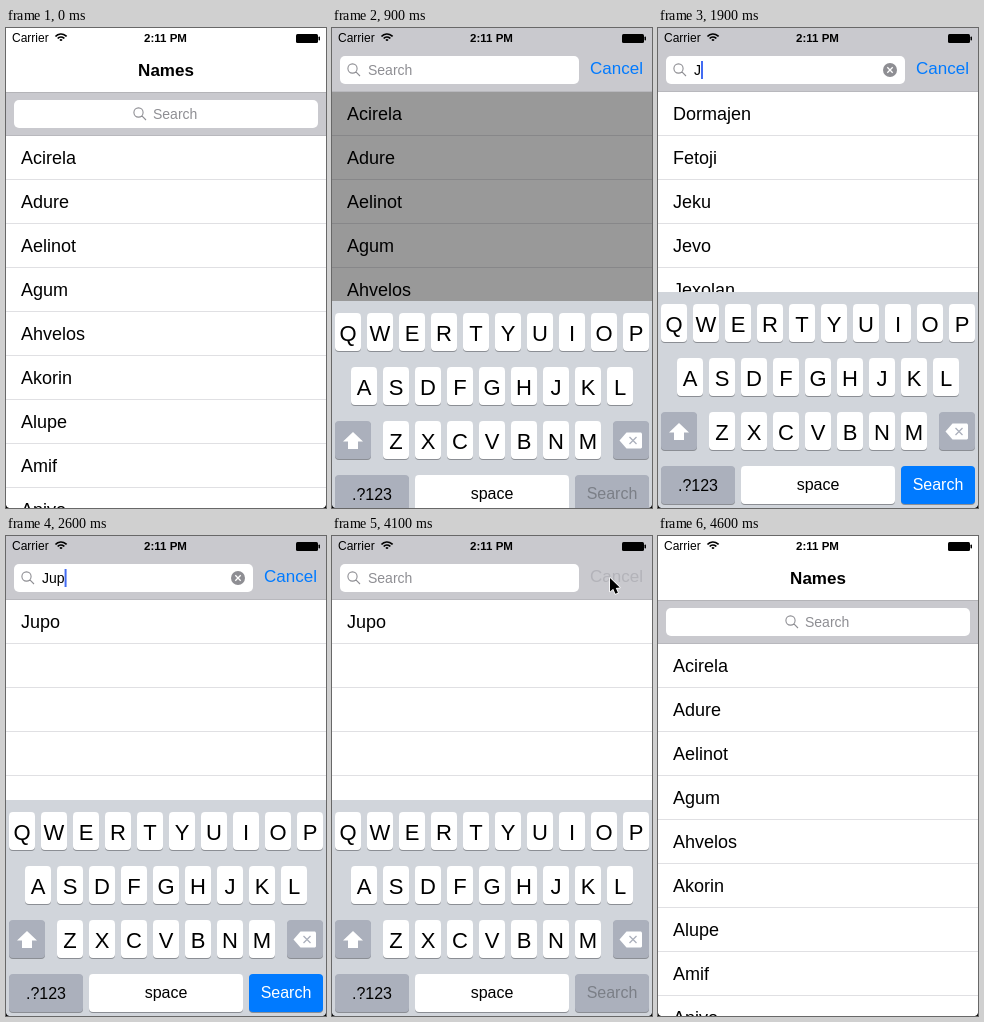
Animation, 320 px wide and 480 px high, one loop 5400 ms. Source, as an HTML page with a canvas:

```html
<!DOCTYPE html>
<html lang="en">
<head>
<meta charset="utf-8">
<title>Search list</title>
<style>
html, body { margin: 0; width: 100%; height: 100%; overflow: hidden; background: #fff; }
canvas { display: block; }
</style>
</head>
<body>
<canvas id="stage" width="320" height="480"></canvas>
<script>
const ctx = document.getElementById('stage').getContext('2d');
const LOOP = 5400, STEP = 100;
const QUERY = 'Jupo', KEY_TIMES = [1900, 2200, 2500, 2800], CLEAR = 4100;
const PEOPLE = ['Acirela', 'Adure', 'Aelinot', 'Agum', 'Ahvelos', 'Akorin', 'Alupe', 'Amif', 'Anivo'];
const RESULTS = [
  ['Dormajen', 'Fetoji', 'Jeku', 'Jevo', 'Jexolan'],
  ['Jupo', 'Juranvel', 'Jusdor', 'Jutemo', 'Juvika'],
  ['Jupo'],
  ['Jupo']
];
const GRAY = '#8e8e93', BLUE = '#007aff', BAR = '#c9c9ce', DARK_KEY = '#abb0bc';

const clamp = v => Math.max(0, Math.min(1, v));
const mix = (a, b, p) => a + (b - a) * p;
const smooth = v => { v = clamp(v); return v * v * (3 - 2 * v); };
const settle = d => d < 0 ? 0 : 1 - Math.exp(-d * 0.0126);

function box(x, y, w, h, color, r = 0) {
  ctx.fillStyle = color;
  ctx.beginPath();
  ctx.roundRect(x, y, w, h, r);
  ctx.fill();
}

function text(s, x, y, size, color = '#000', align = 'left', weight = '') {
  ctx.font = `${weight} ${size}px "Liberation Sans", Arial, sans-serif`;
  ctx.textAlign = align;
  ctx.fillStyle = color;
  ctx.fillText(s, x, y);
}

function poly(points, color) {
  ctx.beginPath();
  points.forEach(([x, y]) => ctx.lineTo(x, y));
  ctx.closePath();
  ctx.fillStyle = color;
  ctx.fill();
}

function cross(x, y, r, color) {
  ctx.beginPath();
  ctx.moveTo(x - r, y - r); ctx.lineTo(x + r, y + r);
  ctx.moveTo(x + r, y - r); ctx.lineTo(x - r, y + r);
  ctx.strokeStyle = color;
  ctx.lineWidth = 1.3;
  ctx.stroke();
}

function drawStatus() {
  text('Carrier', 6, 14, 12);
  ctx.strokeStyle = '#000';
  ctx.lineWidth = 1.7;
  for (const r of [7.4, 4.4, 1.3]) {
    ctx.beginPath();
    ctx.arc(55, 13.4, r, -Math.PI * 0.77, -Math.PI * 0.23);
    ctx.stroke();
  }
  text('2:11 PM', 159.5, 14, 11.5, '#000', 'center', 'bold');
  box(290, 6, 22, 9, '#000', 1.5);
  box(312.5, 8.5, 1.5, 4, '#000', 0.7);
}

function drawList(names, top) {
  box(0, top, 320, 480 - top, '#fff');
  for (let i = 0; top + i * 44 < 480; i++) {
    const y = top + i * 44;
    if (names[i]) text(names[i], 15, y + 28, 18);
    box(0, y + 43, 320, 1, '#e0e0e3');
  }
}

function drawSearchBar(p, query, caret, cancelColor) {
  const top = Math.round(mix(64, 0, p)), bottom = Math.round(mix(108, 64, p));
  const y = Math.round(mix(72, 28, p));
  box(0, 0, 320, top, '#fff');
  text('Names', 160, top - 16, 17, '#000', 'center', 'bold');
  box(0, top, 320, bottom - top, BAR);
  if (top > 0) box(0, top, 320, 1, '#b4b4b8');
  box(0, bottom - 1, 320, 1, '#b8b8bd');
  box(8, y, mix(304, 239, p), 28, '#fff', 5);

  const x = mix(127, 15, p);
  ctx.strokeStyle = GRAY;
  ctx.lineWidth = 1.1;
  ctx.beginPath();
  ctx.arc(x + 5.5, y + 12.5, 4.6, 0, Math.PI * 2);
  ctx.moveTo(x + 8.9, y + 15.9);
  ctx.lineTo(x + 13, y + 20);
  ctx.stroke();

  const textX = mix(147, 36, p);
  text(query || 'Search', textX, y + 19, 14, query ? '#000' : GRAY);
  if (caret > 0) {
    ctx.globalAlpha = caret;
    box(textX + (query ? ctx.measureText(query).width : 0), y + 5, 2, 18, '#426bf2');
    ctx.globalAlpha = 1;
  }
  if (query) {
    box(225, y + 7, 14, 14, GRAY, 7);
    cross(232, y + 14, 2.7, '#fff');
  }
  if (p > 0) text('Cancel', mix(323, 258, p), y + 18, 17, cancelColor);
}

function key(x, y, w, color, label = '', size = 16, base = 24, ink = '#000') {
  box(x, y + 1, w, 38, '#8b8e94', 4);
  box(x, y, w, 38, color, 4);
  text(label, x + w / 2, y + base, size, ink, 'center');
}

function drawKeyboard(top, active) {
  ctx.save();
  ctx.translate(0, top);
  box(0, 0, 320, 216, '#d1d5db');
  [['QWERTYUIOP', 3], ['ASDFGHJKL', 19], ['ZXCVBNM', 51]].forEach(([letters, x], row) =>
    [...letters].forEach((c, i) => key(x + i * 32, 12 + row * 54, 26, '#fff', c, 22, 28)));

  key(3, 120, 36, DARK_KEY);
  poly([[21, 131], [31, 140.5], [26, 140.5], [26, 148], [16, 148], [16, 140.5], [11, 140.5]], '#fff');
  key(281, 120, 36, DARK_KEY);
  poly([[287.5, 139.5], [294.5, 131.5], [309, 131.5], [310, 132.5], [310, 146.5], [309, 147.5], [294.5, 147.5]], '#fff');
  cross(301, 139.5, 3.5, DARK_KEY);

  key(3, 174, 74, DARK_KEY, '.?123', 16, 25);
  key(83, 174, 154, '#fff', 'space');
  key(243, 174, 74, active ? BLUE : DARK_KEY, 'Search', 16, 24, active ? '#fff' : '#7b7f87');
  ctx.restore();
}

function drawPointer(x, y) {
  ctx.save();
  ctx.translate(x, y);
  ctx.lineJoin = 'round';
  poly([[0, 0], [0, 13.5], [3.2, 10.7], [5.4, 15.8], [7.9, 14.8], [5.8, 9.9], [9.8, 9.6]], '#000');
  ctx.strokeStyle = '#fff';
  ctx.lineWidth = 1.6;
  ctx.stroke();
  ctx.fill();
  ctx.restore();
}

function pointerAt(t) {
  if (t >= 300 && t < 800) return t < 700 ? [288 + 7 * clamp((t - 300) / 200), 88] : [295, 84];
  if (t >= 3500 && t < 4400) {
    const p = smooth((t - 3500) / 300);
    return [mix(295, 278, p), mix(84, 42, p)];
  }
}

// The caret stays solid after a key press, then pulses.
function caretAt(t, typed) {
  if (t < 1000 || t >= 4000) return 0;
  const d = t - (typed ? KEY_TIMES[typed - 1] : 700);
  return d < 500 ? 1 : clamp(0.5 + 0.8 * Math.cos((d - 420) / 800 * Math.PI * 2));
}

function draw(t) {
  const opening = t < 4000;
  const p = opening ? smooth((t - 617) / 250) : 1 - smooth((t - 4117) / 250);
  const raised = opening ? settle(t - 649) : 1 - settle(t - 4117);
  const pressed = KEY_TIMES.filter(k => k <= t).length;
  const typed = t < CLEAR ? pressed : 0;
  const listTop = Math.round(mix(108, 64, p));

  drawList(PEOPLE, listTop);
  box(0, listTop, 320, 480 - listTop, `rgba(0,0,0,${0.4 * p})`);
  if (pressed && p > 0) {
    ctx.globalAlpha = p;
    drawList(RESULTS[pressed - 1], listTop);
    ctx.globalAlpha = 1;
  }
  drawSearchBar(p, QUERY.slice(0, typed), caretAt(t, typed), p === 1 && t < 3900 ? BLUE : '#b3b3b9');
  drawStatus();
  const keyboardTop = Math.round(480 - 216 * raised);
  if (keyboardTop < 480) drawKeyboard(keyboardTop, typed > 0);

  // Rounded screen corners
  poly([[0, 477], [1, 479], [3, 480], [0, 480]], '#000');
  poly([[320, 477], [319, 479], [317, 480], [320, 480]], '#000');
  const pointer = pointerAt(t);
  if (pointer) drawPointer(...pointer);
}

const start = performance.now();
function tick() {
  const t = (performance.now() - start) % LOOP;
  draw(Math.floor(t / STEP) * STEP);
  requestAnimationFrame(tick);
}
tick();
</script>
</body>
</html>
```
